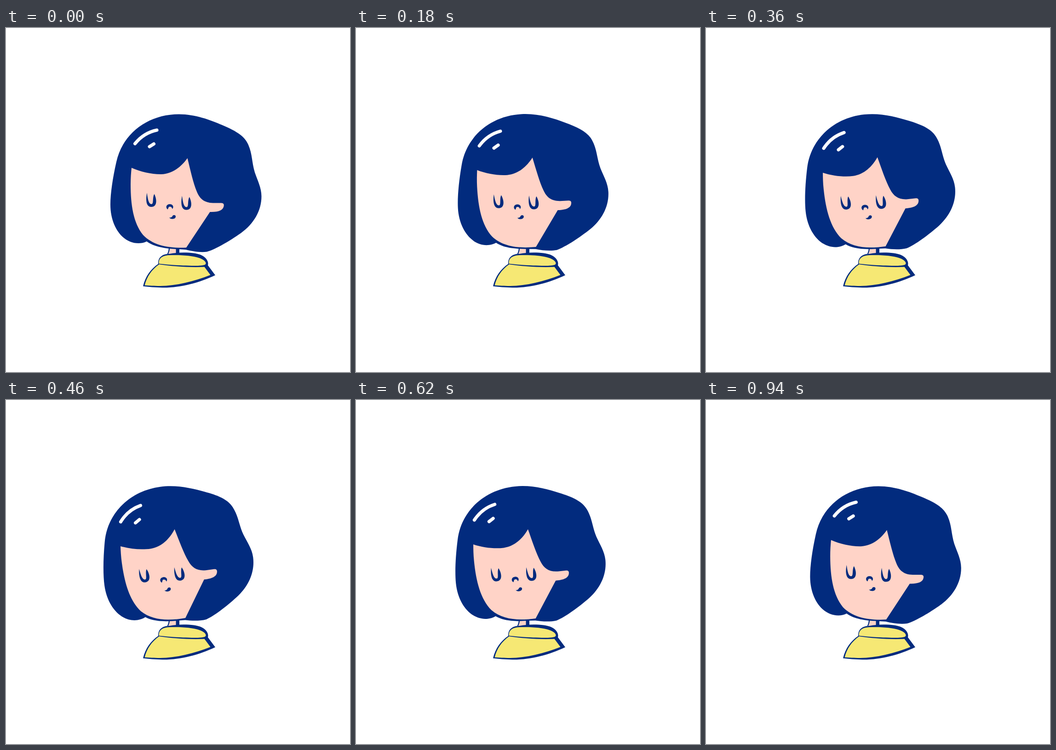
Animation, 748 px wide and 748 px high, one loop 960 ms. Source, as an HTML page:

```html
<!DOCTYPE html>
<html lang="en">
<head>
<meta charset="utf-8">
<title>Nodding girl</title>
<style>
  html, body { margin: 0; width: 100%; height: 100%; overflow: hidden; background: #fff; }
  svg { display: block; width: 100vw; height: 100vh; }
  .navy { fill: #022b7e; }
  .skin { fill: #ffd3c7; }
  .wool { fill: #f6e874; }
  .shine { fill: none; stroke: #fff; stroke-width: 7; stroke-linecap: round; }
</style>
</head>
<body>
<svg viewBox="0 0 748 748">
  <defs>
    <path id="eye" class="navy" d="M306.5 358.5C304 371 303.5 389 316 389C329 389 328.5 373 322.5 361C318 368 321.5 383 316.5 383C310 383 308.3 371 306.5 358.5Z"/>
  </defs>

  <g id="neck">
    <path class="navy" d="M354 474H377V491H350.5Q354 486 354 474Z"/>
    <path class="skin" d="M356.5 474H369.5V491H353Q356.5 484 356.5 474Z"/>
  </g>

  <g id="sweater">
    <path class="navy" d="M331 513C330 498 341 491 356 491C380 486.5 410 488 424 493.5C436 499 441 508 439 516L455 537.5C420 554 380 565 340 564.5C325 564 310 563 298 561.5C303 540 315 524 331 513Z"/>
    <path class="wool" d="M332.5 512.5C331 500 342 494.3 355 494C380 493 405 495 420 500C432 504 437.5 511 433 514.5C425 518 405 517 385 516.5C365 515.5 345 514 332.5 512.5Z"/>
    <path class="wool" d="M333 514C365 518.5 400 521 431.5 519.5L444.5 537C410 551 370 560.5 335 561C322 561 312 560 301.5 559.5C306 541 317 525 333 514Z"/>
  </g>

  <g id="head">
    <path class="navy" d="M306 464C300 467 294 468 288 468C253 468 227 431 227 384C227 360 232 326 240 291C254 228 310 187.5 376 187.5C412 187.5 444 200 470 211C496 222 517 233 526 252C536 273 534 291 541 314C547 332 555.5 347 555.5 366C555.5 398 538 426 512 445C488 462 457 480.5 437 486.5C422 488.5 405 485.5 391 482L377 481C338 480 318 473 306 464Z"/>
    <path class="skin" d="M273 304C293 313 318 318.5 338 318C362 317 381 302 394.5 283C401 309 407 337 415 356C421 371 431 380 450 380.5H468C473 380.5 474.5 383.5 473.5 387.5C472 396 463 400.5 443.5 400L392 477.5C353 479 320 473 298 450C277 424 271 385 271 340C271 326 272 314 273 304Z"/>
    <path class="shine" d="M280.5 251.5C293 236 309 226 328 222M312 258L321.5 252"/>
    <use href="#eye"/>
    <use href="#eye" x="76.3" y="6.5"/>
    <path class="navy" d="M351.5 394.5C346 390 349 383 356 383C363 383 366 389.5 361.5 393.5C361 390 359 388.5 356 388.5C353 388.5 353.5 392 351.5 394.5Z"/>
    <path class="navy" d="M355 412C358 413 361 411 362 409C363 406 369 406 369 410C369 416 358 417 355 412Z"/>
  </g>
</svg>
<script>
  const LOOP = 960, STEP = 20, TILT = 8;
  const PIVOT = "365 490";
  const head = document.getElementById("head");

  // The head swings at constant speed: left for half the loop, then back.
  function draw(ms) {
    const t = Math.floor((ms % LOOP) / STEP) * STEP;
    const swing = 1 - Math.abs(1 - 2 * t / LOOP);
    head.setAttribute("transform", `rotate(${-TILT * swing} ${PIVOT})`);
  }

  let start;
  function tick(now) {
    start ??= now;
    draw(now - start);
    requestAnimationFrame(tick);
  }
  draw(0);
  requestAnimationFrame(tick);
</script>
</body>
</html>
```
